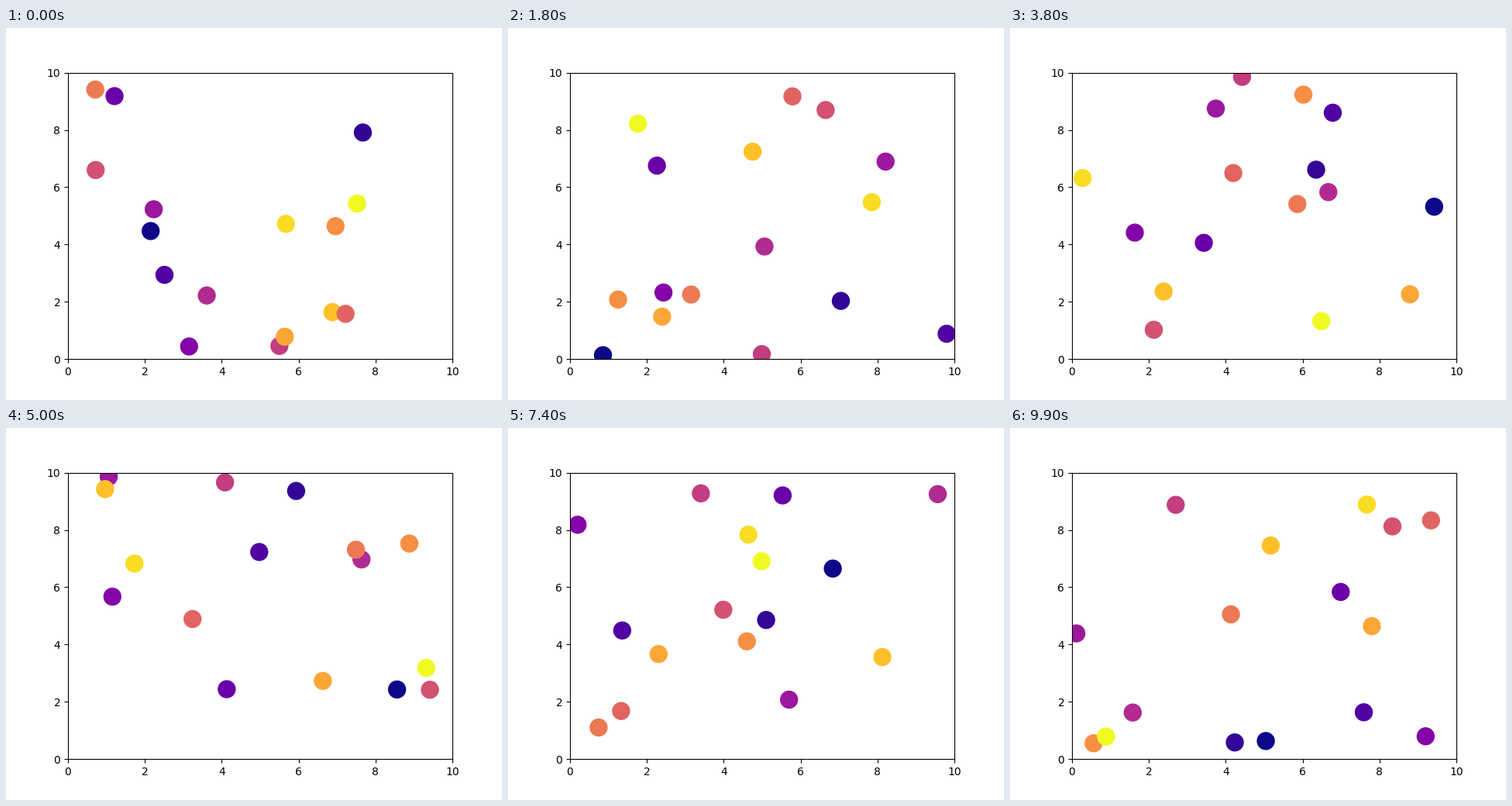
Animation, 640 px wide and 480 px high, one loop 10000 ms. Source, as a matplotlib script:

```python
import numpy as np
import matplotlib.pyplot as plt
from matplotlib.animation import FuncAnimation

SIZE = 10
FRAMES = 100

# one ball per row: start x, y and distance travelled per loop in x, y
BALLS = np.array([
    (2.15, 4.47, -7.18, -24.08), (7.67, 7.91, -3.47, 22.90),
    (2.51, 2.94, -15.07, -11.42), (1.21, 9.18, 5.84, -13.48),
    (3.15, 0.44, -3.99, 10.46), (2.23, 5.23, -22.34, 9.25),
    (3.61, 2.22, 8.05, 9.50), (5.50, 0.46, -2.83, -1.60),
    (0.72, 6.60, -22.61, 11.64), (0.71, 9.41, 13.56, 15.80),
    (6.96, 4.64, 23.84, -14.23), (5.64, 0.78, -18.02, 3.90),
    (6.88, 1.64, -11.83, -24.43), (7.22, 1.58, -7.96, -13.38),
    (5.67, 4.72, 12.12, 4.21), (7.52, 5.43, 23.60, 15.51),
])
start, travel = BALLS[:, :2], BALLS[:, 2:]

# shades rise with drawing order, except one red ball that lies on top
shades = [*range(9), *range(10, 14), 9, 14, 15]

fig, ax = plt.subplots(figsize=(6.4, 4.8), dpi=100)
ax.set(xlim=(0, SIZE), ylim=(0, SIZE))
dots = ax.scatter(*start.T, s=250, c=shades, cmap="plasma")


def update(i):
    # straight paths; balls leaving one side come back on the other
    dots.set_offsets((start + travel * i / FRAMES) % SIZE)
    return (dots,)


anim = FuncAnimation(fig, update, frames=FRAMES, interval=100,
                     repeat=True, repeat_delay=0)
plt.show()
```
